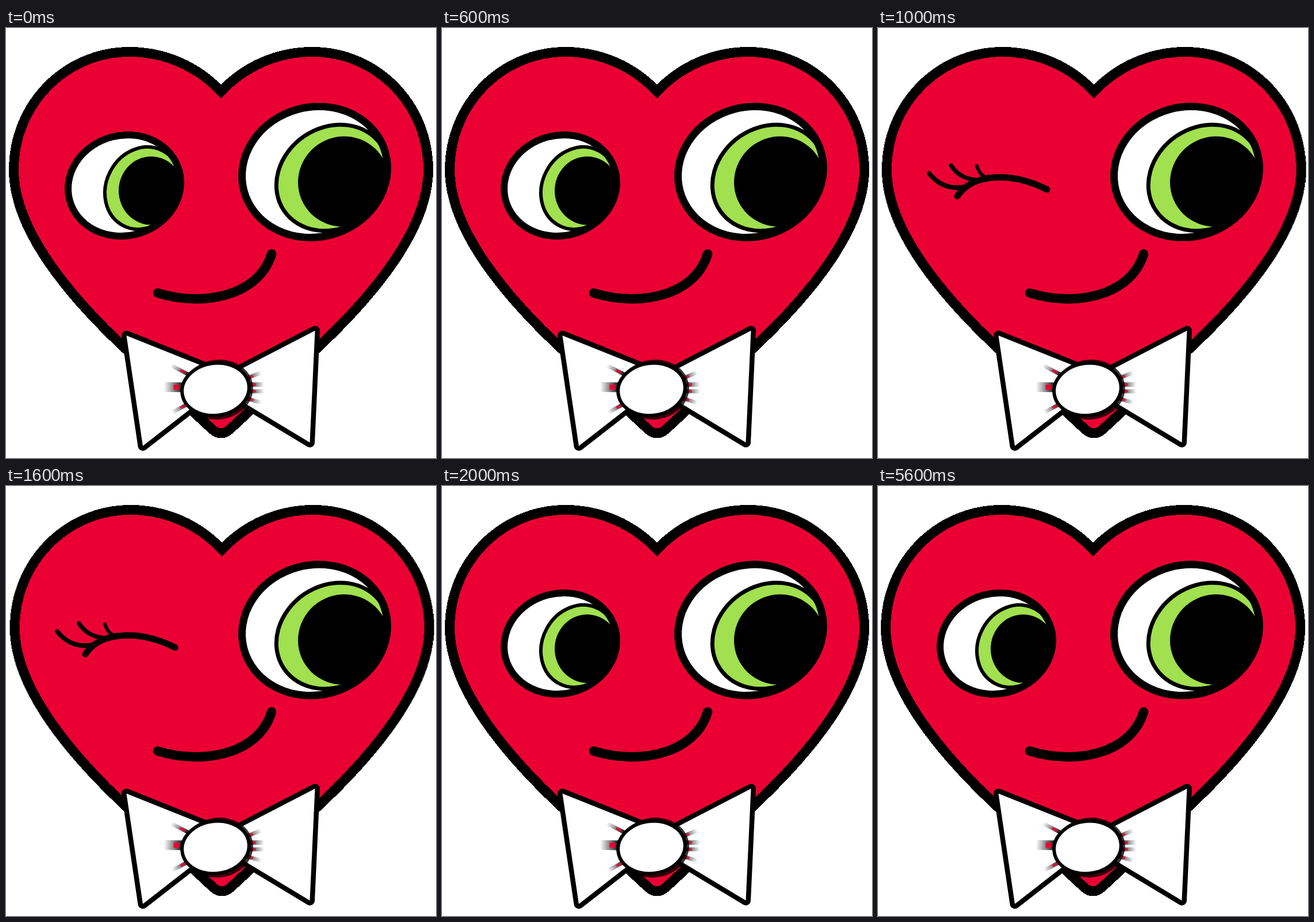
An HTML page for the animation above (8000 ms loop, 748 by 748 pixels).

```html
<!DOCTYPE html>
<html lang="en">
<head>
<meta charset="utf-8">
<title>Winking heart</title>
<style>
  html, body { margin: 0; width: 100%; height: 100%; overflow: hidden; background: #fff; }
  svg { display: block; width: 100vw; height: 100vh; }
  .line { fill: none; stroke: #000; stroke-linecap: round; stroke-linejoin: round; }
  .wing { fill: #fff; stroke: #000; stroke-width: 17; stroke-linejoin: round; paint-order: stroke; }
  #wink { visibility: hidden; }
</style>
</head>
<body>
<svg viewBox="0 0 748 748" xmlns="http://www.w3.org/2000/svg">
  <path id="heart" fill="#eb0033" stroke="#000" stroke-width="17" shape-rendering="crispEdges"
    d="M374 110.5C333 67 277 41.5 215 41.5C103 41.5 13.5 133 13.5 247C13.5 345 100 457 209 559
       L359 698.5Q374 711.5 389 698.5L539 559C648 457 734.5 345 734.5 247
       C734.5 133 645 41.5 533 41.5C471 41.5 415 67 374 110.5Z"/>

  <g id="openEye"></g>
  <g id="bigEye"></g>

  <g id="wink" class="line">
    <path stroke-width="11" d="M138 292.5C165 251 235 251 294 281"/>
    <path stroke-width="8" d="M89 253Q114 284 152 276"/>
    <path stroke-width="7.5" d="M127 239Q141 261 168 264"/>
    <path stroke-width="6" d="M172 240Q176 255 188 260"/>
  </g>

  <path class="line" stroke-width="16.5" d="M264 461C340 485 439 468 462 393"/>

  <path class="wing" d="M209.500 535L352 592L319 664L238 727Z"/>
  <path class="wing" d="M537.500 526.500L411 592L414 652L528.500 721Z"/>
  <g id="folds" fill="none"></g>
  <ellipse cx="368.5" cy="629" rx="61.5" ry="52" opacity=".78" transform="rotate(-8 368.5 629)"/>
  <ellipse cx="364.5" cy="628.5" rx="58.5" ry="45.5" fill="#fff" stroke="#000" stroke-width="6"
    transform="rotate(-8 364.5 628.5)"/>
</svg>

<script>
const $ = id => document.getElementById(id);

const oval = ([x, y, a, b, turn = 0], style) =>
  `<ellipse cx="${x}" cy="${y}" rx="${a}" ry="${b}" transform="rotate(${turn} ${x} ${y})" ${style}/>`;

function drawEye(id, ball, iris, pupil, rim, ring) {
  $(id).innerHTML =
    `<clipPath id="${id}Clip">${oval(ball, '')}</clipPath>` +
    oval(ball, 'fill="#fff"') +
    `<g clip-path="url(#${id}Clip)">` +
    oval(iris, `fill="#a1e04f" stroke="#000" stroke-width="${ring}"`) +
    oval(pupil, 'fill="#000"') + '</g>' +
    oval(ball, `fill="none" stroke="#000" stroke-width="${rim}"`);
}

// Ovals: centre x, centre y, radii, rotation
drawEye('openEye', [206, 274, 98.7, 87.2, -15], [238, 278.5, 73.6, 63.6, -61.7], [252.5, 283, 56.5, 59.5], 12, 6);
drawEye('bigEye', [537, 250.5, 127.4, 113, -15], [568, 260.5, 102, 87.5, -34], [587, 267, 79.5, 78, -35], 13, 7);

// Creases beside the knot, fading outwards: outer end, inner end, width
const folds = [
  [287, 587, 318, 603, 7],
  [275, 624.5, 308, 625, 17],
  [289, 669, 318, 653, 7],
  [444, 599, 415, 611, 7],
  [449, 620, 420, 620.5, 8],
  [449, 632, 420, 632, 7],
  [444, 652, 415, 643, 7]
];
$('folds').innerHTML = folds.map(([x, y, u, v, w], i) => {
  const at = k => `${x + (u - x) * k} ${y + (v - y) * k}`;
  return `<linearGradient id="fade${i}" gradientUnits="userSpaceOnUse" x1="${x}" y1="${y}" x2="${u}" y2="${v}">
      <stop offset="0" stop-opacity="0"/><stop offset=".9" stop-opacity=".85"/>
    </linearGradient>
    <path d="M${at(0)}L${at(1)}" stroke="url(#fade${i})" stroke-width="${w}"/>
    <path d="M${at(.5)}L${at(.8)}" stroke="#eb0033" stroke-width="${w * .5}"/>`;
}).join('');

// Each step: start time in ms, eye closed
const LOOP = 8000;
const steps = [[0, false], [1000, true], [2000, false]];

function play(id, pose) {
  const keys = steps.map(([t, shut]) => ({ offset: t / LOOP, easing: 'step-end', ...pose(shut) }));
  keys.push({ ...keys[keys.length - 1], offset: 1 });
  $(id).animate(keys, { duration: LOOP, iterations: Infinity });
}

play('heart', shut => ({ transform: `translate(${shut ? 1.6 : 0}px, 0px)` }));
play('openEye', shut => ({ visibility: shut ? 'hidden' : 'visible' }));
play('wink', shut => ({ visibility: shut ? 'visible' : 'hidden' }));
</script>
</body>
</html>
```
